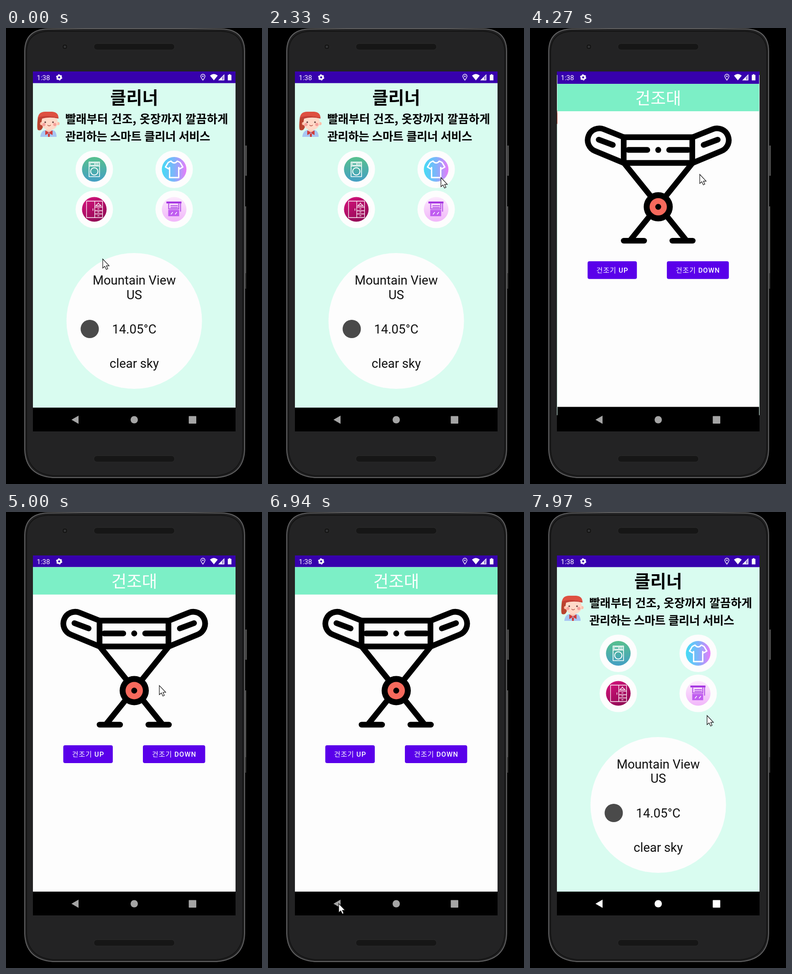
Write an HTML page that moves like this. It is 561 px wide and 997 px high and loops after 8000 ms.

```html
<!DOCTYPE html>
<html lang="ko">
<head>
<meta charset="utf-8">
<title>클리너</title>
<style>
  html, body { margin: 0; width: 100%; height: 100%; overflow: hidden; background: #000; }
  svg { display: block; width: 100%; height: 100%; }
  text { font-family: Roboto, "Noto Sans CJK KR", "Noto Sans CJK", sans-serif; }
  .ko { font-family: "Noto Sans CJK KR", "Noto Sans CJK", sans-serif; }
  .line { fill: none; stroke: #fff; stroke-width: 1.6; stroke-linejoin: round; }
  .frame { fill: none; stroke: #000; stroke-width: 12.5; stroke-linecap: round; stroke-linejoin: round; }
  .button { font-size: 15px; font-weight: 500; fill: #fff; letter-spacing: 1px; }
</style>
</head>
<body>
<svg viewBox="0 0 561 997">
  <defs>
    <clipPath id="glass"><rect x="59" y="95" width="444" height="787"/></clipPath>
    <clipPath id="portrait"><rect x="66" y="182" width="54" height="56"/></clipPath>
    <linearGradient id="washerFill" x2="0" y2="1"><stop stop-color="#58c08e"/><stop offset="1" stop-color="#449fc4"/></linearGradient>
    <linearGradient id="shirtFill"><stop stop-color="#45dcf5"/><stop offset=".5" stop-color="#7eb4fa"/><stop offset="1" stop-color="#e87bfa"/></linearGradient>
    <linearGradient id="closetFill" x2=".6" y2="1"><stop stop-color="#d8147f"/><stop offset="1" stop-color="#930a55"/></linearGradient>
    <linearGradient id="rackFill" x2="0" y2="1"><stop stop-color="#fce9fc"/><stop offset="1" stop-color="#f1b6fa"/></linearGradient>
  </defs>

  <!-- phone -->
  <path fill="#30302f" d="M523 257h4.500v66H523zM523 390h3.500v180H523z"/>
  <path fill="#5a5a5a" d="M525.500 257h2v66h-2zM524.500 390h1.500v146h-1.500z"/>
  <path fill="#232324" stroke="#626263" stroke-width="2"
    d="M41 50Q42 3 92 2L172 1H392L472 2Q522 3 523 50V922Q521 978 462 983H102Q43 978 41 922Z"/>
  <path fill="none" stroke="#131313" stroke-width="2"
    d="M45 52Q46 8 94 7H470Q518 8 519 52V920Q517 974 460 979H104Q47 974 45 920Z"/>
  <g fill="#161616" stroke="#2c2c2c">
    <rect x="192.500" y="34" width="177" height="14" rx="7"/>
    <rect x="192.500" y="935" width="177" height="14" rx="7"/>
    <circle cx="129" cy="41" r="6"/>
  </g>
  <circle cx="129" cy="41" r="2.500" fill="#343536"/>

  <g clip-path="url(#glass)">
    <rect x="59" y="95" width="444" height="787"/>

    <g id="home">
      <rect x="59" y="95" width="444" height="26" fill="#3700ad"/>
      <rect x="59" y="120.500" width="444" height="709.500" fill="#d9fcf0"/>
      <text class="ko" x="281" y="165.500" font-size="38" font-weight="900" text-anchor="middle">클리너</text>
      <g font-size="25.400" font-weight="700">
        <text class="ko" x="130" y="208">빨래부터 건조, 옷장까지 깔끔하게</text>
        <text class="ko" x="130" y="246" letter-spacing="-.5">관리하는 스마트 클리너 서비스</text>
      </g>

      <g clip-path="url(#portrait)">
        <path fill="#b9432f" d="M70 194Q67 220 70 223Q78 226 81 216L78 192Z"/>
        <path fill="#a8c6f3" d="M75 240Q76 224 87 223H101Q111 224 111 240Z"/>
        <path fill="#ffc9b5" d="M88 215h11v12H88z"/>
        <circle cx="78" cy="209" r="3.500" fill="#ffc0aa"/><circle cx="114" cy="209" r="3.500" fill="#ffc0aa"/>
        <rect x="78" y="189" width="35" height="34" rx="16" fill="#ffd9c8"/>
        <path fill="#de5041" d="M70 197Q71 183 86 183H101Q115 184 115 197Q98 191 86 195Q77 197 70 197Z"/>
        <path fill="#c23f35" d="M70 196Q85 189 115 196V198Q94 193 77 199Z"/>
        <g fill="#f6a09b"><circle cx="83" cy="211" r="3.500"/><circle cx="107" cy="211" r="3.500"/></g>
        <g fill="#5a3030"><circle cx="86" cy="206" r="1.700"/><circle cx="103" cy="206" r="1.700"/></g>
        <path fill="none" stroke="#b85b4c" stroke-width="1.300" d="M91 212Q94.500 216 98 212"/>
        <path fill="#cf3e3c" d="M94 228L86 224V234L94 230L102 234V224ZM92 229h4v9h-4z"/>
      </g>

      <g fill="#fdfdfd">
        <circle cx="193.500" cy="309" r="41"/><circle cx="368.500" cy="309" r="41"/>
        <circle cx="193.500" cy="396.500" r="41"/><circle cx="368.500" cy="396.500" r="41"/>
        <circle cx="281" cy="640.500" r="148.500"/>
      </g>
      <g transform="translate(193.500 309)">
        <circle r="27" fill="url(#washerFill)"/>
        <path class="line" d="M-11.500-16H11.500V16H-11.500ZM-11.500-7H11.500"/>
        <path fill="#fff" d="M-10-15H10V-8H-10Z" opacity=".75"/>
        <path fill="#4fb29f" d="M-8-13H0V-10H-8Z"/>
        <circle cx="4" cy="-11.500" r="1.300" fill="#4fb29f"/><circle cx="8" cy="-11.500" r="1.300" fill="#4fb29f"/>
        <circle class="line" cy="4.500" r="8" style="stroke-width:2"/>
      </g>
      <g transform="translate(368.500 309)">
        <circle r="27" fill="url(#shirtFill)"/>
        <path class="line" style="stroke-width:3" d="M-7-18Q0-10 7-18L13-15L19-5L12-1L10-4V18H-10V-4L-12-1L-19-5L-13-15Z"/>
      </g>
      <g transform="translate(193.500 396.500)">
        <circle r="27" fill="url(#closetFill)"/>
        <path class="line" style="stroke-width:1.300" d="M-17-18H18V18H-17ZM1-18V18M1-5H18M1 3H18M1 10H18M-3-2V3M7-1H11M7 6H11M7 14H11M9-15V-13L15-8H3L9-13"/>
      </g>
      <g transform="translate(368.500 396.500)">
        <circle r="27" fill="url(#rackFill)"/>
        <path fill="#a22fe0" d="M-17-17H16V-13H-17Z"/>
        <path fill="none" stroke="#b04be6" stroke-width="2" d="M14-14V5M-12-13V-1H10V-13M-8-8H8M-8-4H8"/>
        <path fill="#c05cf0" d="M-13 1H11V15H-13Z"/>
        <path class="line" d="M-7 11L-3 6M2 11L6 6"/>
      </g>

      <g font-size="27.500" text-anchor="middle" fill="#111">
        <text x="281" y="561">Mountain View</text>
        <text x="281" y="592.500">US</text>
        <text x="281" y="668">14.05°C</text>
        <text x="281" y="743">clear sky</text>
      </g>
      <circle cx="183.500" cy="658" r="20" fill="#4a4a4a"/>
    </g>

    <g id="dryer">
      <rect x="59" y="95" width="444" height="787"/>
      <rect x="59" y="95" width="444" height="26" fill="#3700ad"/>
      <rect x="59" y="120.500" width="444" height="709.500" fill="#fdfdfd"/>
      <rect x="59" y="120.500" width="444" height="60" fill="#7cefc6"/>
      <text class="ko" x="281" y="165" font-size="36.500" fill="#fff" text-anchor="middle">건조대</text>

      <path class="frame" d="M207 296L341 462M355 296L221 462M205 465H250M312 465H357"/>
      <path class="frame" d="M205 237.500H356V294H205Z"/>
      <g id="arm">
        <path class="frame" d="M205 237.500L161 220A25.300 25.300 0 1 0 142 268L205 294"/>
        <path class="frame" d="M150 243L181 254.500M215 265.500H257"/>
      </g>
      <use href="#arm" transform="matrix(-1 0 0 1 562 0)"/>
      <circle cx="281" cy="265.500" r="6.500"/>
      <circle cx="281" cy="390.500" r="32"/>
      <circle cx="281" cy="390.500" r="19" fill="#f7695c"/>
      <circle cx="281" cy="390.500" r="6.500"/>

      <g fill="#5a00ea">
        <rect x="125.500" y="510" width="108.500" height="39" rx="4"/>
        <rect x="300" y="510" width="136.500" height="39" rx="4"/>
      </g>
      <text class="button" x="180" y="535" text-anchor="middle">건조기 UP</text>
      <text class="button" x="368.500" y="535" text-anchor="middle">건조기 DOWN</text>
    </g>

    <!-- system bars -->
    <g fill="#fff">
      <text x="67.500" y="113.500" font-size="15">1:38</text>
      <circle cx="116.500" cy="108" r="4" fill="none" stroke="#fff" stroke-width="3.500"/>
      <circle cx="116.500" cy="108" r="5.800" fill="none" stroke="#fff" stroke-width="2" stroke-dasharray="3.040"/>
      <path fill="none" stroke="#fff" stroke-width="1.400" d="M431.500 114Q427 108 427 105.500A4.500 4.500 0 0 1 436 105.500Q436 108 431.500 114Z"/>
      <circle cx="431.500" cy="105.500" r="1.500"/>
      <path d="M447 104Q455.500 97 464 104L455.500 114.500ZM478.500 101V114.500H465Z"/>
      <path d="M486 102.500H488.500V101H491.500V102.500H494V114.500H486Z"/>
      <path fill="#3700ad" d="M473 108l4-4v9h-4z" opacity=".45"/>
    </g>
    <rect id="ripple" x="94" y="832" width="116" height="49" rx="24" fill="#fff"/>
    <g id="nav">
      <path d="M143.500 856.500L159 847.500V865.500Z"/>
      <circle cx="281" cy="856.500" r="8"/>
      <rect x="400.500" y="848.500" width="16.500" height="16.500" rx="1"/>
    </g>
  </g>

  <path id="cursor" fill="#fff" stroke="#111" stroke-width="1.200" d="M0 0V20L4.500 16L7.800 23L11 21.500L8 14.800H14Z"/>
</svg>

<script>
  const LOOP = 8000, OPEN = 4041, CLOSE = 7573, SLIDE = 400;
  const $ = id => document.getElementById(id);
  const clamp = v => Math.min(1, Math.max(0, v));
  const mix = (a, b, k) => a + (b - a) * k;

  // Cursor stops: time, x, y
  const stops = [
    [0, 212, 505], [400, 212, 505], [1700, 379, 327], [2800, 379, 327], [3500, 372, 320],
    [4700, 372, 320], [5600, 234, 548], [6050, 234, 548], [6700, 155, 856],
    [7420, 155, 856], [7640, 370, 580], [7920, 388, 445], [LOOP, 388, 445]
  ];

  const cubic = (a, b, c, d, s) => {
    const r = 1 - s;
    return r * r * r * a + 3 * r * r * s * b + 3 * r * s * s * c + s * s * s * d;
  };

  // Two joined Bezier curves: a quick start and a long, slow settling
  function slideEase(x) {
    if (x <= 0 || x >= 1) return clamp(x);
    const knot = 1 / 6;
    const [xs, ys] = x < knot
      ? [[0, .05, .133333, knot], [0, 0, .06, .4]]
      : [[knot, .208333, .25, 1], [.4, .82, 1, 1]];
    let low = 0, high = 1;
    for (let i = 0; i < 24; i++) {
      const mid = (low + high) / 2;
      if (cubic(...xs, mid) < x) low = mid; else high = mid;
    }
    return cubic(...ys, low);
  }

  function place(id, scale, opacity) {
    $(id).setAttribute("transform", `translate(281 488.500) scale(${scale}) translate(-281 -488.500)`);
    $(id).setAttribute("opacity", opacity);
  }

  function cursorAt(t) {
    const i = stops.findIndex(s => s[0] > t);
    const [t0, x0, y0] = stops[i - 1], [t1, x1, y1] = stops[i];
    const k = (t - t0) / (t1 - t0), eased = k * k * (3 - 2 * k);
    return [mix(x0, x1, eased), mix(y0, y1, eased)];
  }

  function draw(now) {
    const t = now % LOOP;
    const opening = t < CLOSE;
    const start = opening ? OPEN : CLOSE;
    const k = slideEase((t - start) / SLIDE);
    if (opening) {
      place("home", mix(1, 1.05, k), 1);
      place("dryer", mix(.85, 1, k), clamp((t - start - 50) / 50));
    } else {
      place("home", mix(1.1, 1, k), 1);
      place("dryer", mix(1, .9, k), 1 - clamp((t - start - 35) / 50));
    }
    $("nav").setAttribute("fill", t < 7400 ? "#a5a5a5" : "#fff");
    $("ripple").setAttribute("opacity", t < 7400 ? 0 : .1 * clamp((7780 - t) / 300));
    $("cursor").setAttribute("transform", `translate(${cursorAt(t)})`);
    requestAnimationFrame(() => draw(performance.now() - begin));
  }

  const begin = performance.now();
  draw(0);
</script>
</body>
</html>
```
